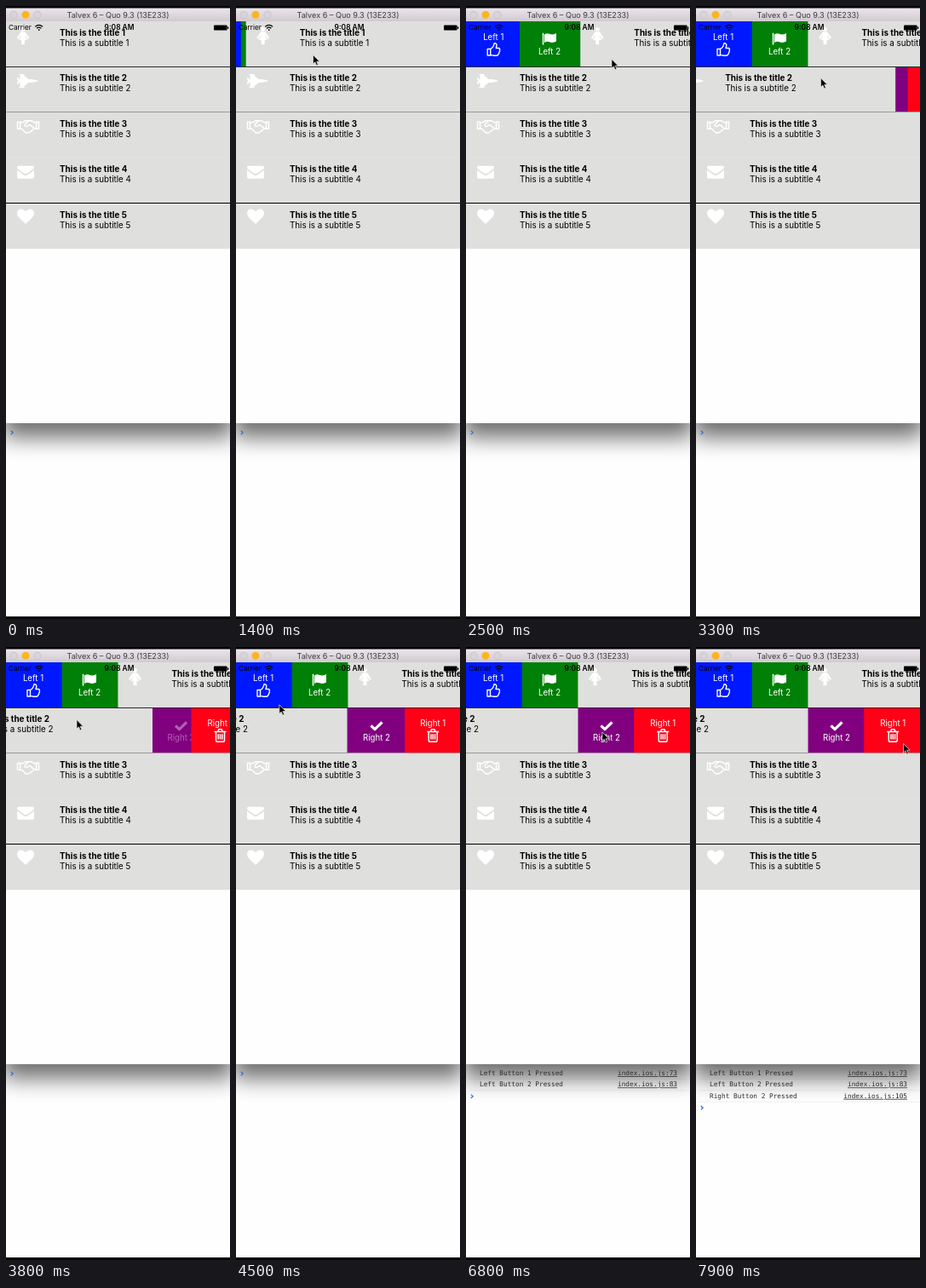
Write an HTML page that moves like this. It is 263 by 720 pixels and loops after 8 s.

```html
<!DOCTYPE html>
<html lang="en">
<head>
<meta charset="utf-8">
<title>Swipeable list</title>
<style>
  html, body { margin: 0; width: 263px; height: 720px; overflow: hidden; background: #fefefe; }
  svg { display: block; font-family: Inter, Roboto, sans-serif; }
  .title { font-size: 9.9px; font-weight: 700; }
  .sub { font-size: 9.8px; }
  .label { font-size: 9.7px; fill: #fff; text-anchor: middle; }
  .log { font: 7.75px "DejaVu Sans Mono", monospace; fill: #2b2b2b; }
  .link { text-anchor: end; text-decoration: underline; }
  .solid { fill: #fff; }
  .outline { fill: none; stroke: #fff; stroke-linejoin: round; }
</style>
</head>
<body>
<svg id="stage" width="263" height="720" viewBox="0 0 263 720">
  <defs>
    <linearGradient id="bar" x2="0" y2="1">
      <stop stop-color="#ece5ec"/><stop offset="1" stop-color="#d0cbd0"/>
    </linearGradient>
    <filter id="soft" x="-30%" y="-30%" width="160%" height="160%"><feGaussianBlur stdDeviation="13"/></filter>
    <clipPath id="below"><rect y="490" width="263" height="227"/></clipPath>
  </defs>
  <rect width="263" height="720" fill="#fefefe"/>
  <g clip-path="url(#below)">
    <rect x="-4" y="300" width="271" height="207" opacity=".56" filter="url(#soft)"/>
  </g>
  <g id="console"></g>
  <path id="prompt" d="M5.8-2.2L8.2 0 5.8 2.2" fill="none" stroke="#2f6fd8" stroke-width="1.2"/>
  <g id="list"></g>
  <g id="lines"></g>
  <g id="status">
    <text x="3" y="28.3" font-size="8.2">Carrier</text>
    <g fill="none" stroke="#000" stroke-width="1.2">
      <path d="M34.3 24.2q4.4-3.6 8.8 0M36 26.2q2.7-2.2 5.4 0"/>
      <path d="M38 28.2h1.4" stroke-width="1.8"/>
    </g>
    <text x="133" y="28.4" font-size="8.4" font-weight="600" text-anchor="middle">9:08 AM</text>
    <rect x="244" y="22.6" width="15.6" height="6" rx="1"/>
    <rect x="260" y="24.4" width="1.3" height="2.4"/>
  </g>
  <rect width="263" height="10" fill="#000"/>
  <rect y="2.5" width="263" height="15.5" fill="url(#bar)"/>
  <g fill="#d9d4d9" stroke="#c6c1c6" stroke-width=".8">
    <circle cx="9" cy="10.3" r="4.1"/><circle cx="37" cy="10.3" r="4.1"/>
  </g>
  <circle cx="23" cy="10.3" r="4.5" fill="#fbb51e"/>
  <text x="131.5" y="13.7" font-size="9.1" fill="#3c3a3c" text-anchor="middle">Talvex 6 – Quo 9.3 (13E233)</text>
  <rect y="717" width="263" height="3"/>
  <path id="cursor" d="M0 0V10.5L2.4 8.3 4 12.2 5.8 11.4 4.2 7.7H7.6z" stroke="#e8e8e8" stroke-width=".7"/>
</svg>
<script>
const W = 263, TOP = 18, ROW_H = 53.4, OPEN = 131.5, HALF = OPEN / 2;
const LOOP = 8000, STEP = 100;
const $ = id => document.getElementById(id);
const clamp = v => Math.max(0, Math.min(1, v));
const moveTo = (node, x, y) => node.setAttribute('transform', `translate(${x} ${y})`);

function add(parent, tag, attrs = {}, text = '') {
  const node = document.createElementNS('http://www.w3.org/2000/svg', tag);
  for (const key in attrs) node.setAttribute(key, attrs[key]);
  node.textContent = text;
  parent.append(node);
  return node;
}

const solid = d => ({ d, class: 'solid' });
const outline = (d, width) => ({ d, class: 'outline', 'stroke-width': width });

const icons = {
  person: solid('M0-9.7a2.5 2.5 0 0 1 0 5 2.5 2.5 0 0 1 0-5zM-2.5-4.2h5L7 2.2q.6 1.4-.6 1.8-1 .2-1.5-.6L2.3-.6V.4L5 5.5H2V10q0 .8-1 .8H-1q-1 0-1-.8V5.5H-5L-2.3.4V-.6L-4.9 3.4q-.6.8-1.5.6-1.2-.4-.6-1.8z'),
  jet: solid('M-9.5-8h6q1 0 0 .8h-1l6 5.2h3.5l6 1.2q1.5.4 1.5.8t-1.5.8L5 2H1.5l-6 5.2h1q1 .8 0 .8h-6q-1 0 0-.8h1V2h-1l-1.5 2h-1V1.5h.8v-3h-.8V-4h1l1.5 2h1V-7.2h-1q-1-.8 0-.8z'),
  shake: outline('M-12.5-5h3v8h-3zM12.5-5h-3v8h3zM-9.5-4.5h3l3-2H0M9.5-4.5h-2L4-6.5H.5l-4 4q-1 2 .5 2.6 2 .6 3.5-1.6h2L8 3h2M-9.5 3h2l4 4q2 1.5 3 .3 2 .6 2.6-.9 2 0 2-1.7 2 0 1.8-1.8', 1.5),
  mail: solid('M-10-2.5l8 5.7q2 1.2 4 0l8-5.7V5.7q0 1.8-1.8 1.8H-8.2Q-10 7.5-10 5.7zM-8.2-7.5H8.2Q10-7.5 10-5.8 10-4.4 8-3L2 1.4q-2 1.2-4 0L-8-3Q-10-4.4-10-5.8-10-7.5-8.2-7.5z'),
  heart: solid('M0 8.8L-7.8 1.2Q-10-1-10-4-10-8.8-5-8.8-2.4-8.8 0-5.9 2.4-8.8 5-8.8 10-8.8 10-4 10-1 7.8 1.2z'),
  thumb: outline('M-7-.5h3.5V7H-7zM-3.5-.5C-1.5-1.5.5-4 .8-7 2.5-7.6 4-6.5 3.8-4.5L3-1.5H6.2Q8-1 7.2.8 8 2.5 6.6 3.4 7 5 5.6 5.6 5.6 7.3 3.5 7.3H.5Q-1.5 7-3.5 6.3', 1.4),
  flag: solid('M-8.2-6.8h1.5V7h-1.5zM-6-5q3-2 6-.8 4 1.8 8-.6V3q-4 2.4-8 .8-3-1.2-6 .8z'),
  check: outline('M-6.5 0L-2 4.3 6.5-4', 3.2),
  trash: outline('M-5-4.5V5.5q0 1.8 1.8 1.8h6.4Q5 7.3 5 5.5V-4.5M-7-4.5H7M-2.8-4.5l1-2.7h3.6l1 2.7M-2.3-1.8V4.5M0-1.8V4.5M2.3-1.8V4.5', 1.5)
};

function addIcon(parent, name, x, y) {
  moveTo(add(parent, 'path', icons[name]), x, y);
}

// Each row: icon name, icon centre x and y.
const rows = [['person', 20, 16.5], ['jet', 25, 16.5], ['shake', 26, 16.5], ['mail', 23, 17], ['heart', 23, 15.6]]
  .map(([icon, x, y], i) => {
    const group = add($('list'), 'g', { transform: `translate(0 ${TOP + i * ROW_H})` });
    const face = add(group, 'g');
    add(face, 'rect', { width: W, height: ROW_H + .2, fill: '#dfdfde' });
    addIcon(face, icon, x, y);
    add(face, 'text', { x: 63, y: 17, class: 'title' }, `This is the title ${i + 1}`);
    add(face, 'text', { x: 63, y: 29, class: 'sub' }, `This is a subtitle ${i + 1}`);
    return { group, face };
  });

[[71, '#2c2c2c'], [124, '#989898'], [231, '#000']].forEach(([y, fill]) =>
  add($('lines'), 'rect', { y, width: W, height: 1, fill }));

function addButton(row, fill, label, labelY, icon, iconY) {
  const group = add(row.group, 'g');
  const back = add(group, 'rect', { height: ROW_H, fill });
  const content = add(group, 'g');
  add(content, 'text', { y: labelY, class: 'label' }, label);
  addIcon(content, icon, 0, iconY);
  const shade = add(group, 'rect', { height: ROW_H, opacity: .2 });
  return { back, content, shade };
}

const left2 = addButton(rows[0], '#008007', 'Left 2', 38.6, 'flag', 20.5);
const left1 = addButton(rows[0], '#0018ff', 'Left 1', 21.8, 'thumb', 33);
const right2 = addButton(rows[1], '#800080', 'Right 2', 38.8, 'check', 21);
const right1 = addButton(rows[1], '#ff0016', 'Right 1', 21.8, 'trash', 32.6);

function placeButton({ back, content, shade }, x, width, centre, opacity, pressed) {
  for (const rect of [back, shade]) {
    rect.setAttribute('x', x);
    rect.setAttribute('width', Math.max(0, width));
  }
  shade.setAttribute('visibility', pressed ? 'visible' : 'hidden');
  moveTo(content, centre, 0);
  content.setAttribute('opacity', clamp(opacity));
}

const LOG_H = 13.4;
const logs = [
  [5200, 'Left Button 1 Pressed', 73],
  [6100, 'Left Button 2 Pressed', 83],
  [7100, 'Right Button 2 Pressed', 105]
].map(([time, message, line], i) => {
  const y = 503 + i * LOG_H;
  const group = add($('console'), 'g');
  add(group, 'text', { x: 16, y, class: 'log' }, message);
  add(group, 'text', { x: 248, y, class: 'log link' }, `index.ios.js:${line}`);
  add(group, 'rect', { x: 3, y: y + 4, width: 260, height: .7, fill: '#8a97b0', opacity: .2 });
  return { time, group };
});

// Keys are [time, value, ...]; values run straight between them.
function track(keys, t) {
  const next = keys.findIndex(key => key[0] > t);
  if (next === 0) return keys[0].slice(1);
  if (next < 0) return keys[keys.length - 1].slice(1);
  const a = keys[next - 1], b = keys[next];
  const p = (t - a[0]) / (b[0] - a[0]);
  return a.slice(1).map((v, i) => v + (b[i + 1] - v) * p);
}

const cursorKeys = [
  [300, 40.5, 178], [400, 45.5, 159.5], [500, 45.5, 159.5], [800, 62, 100], [1100, 76.5, 57.5],
  [1200, 76.5, 57.5], [1400, 90.5, 57.5], [2100, 190, 60.5], [2200, 203, 61], [2300, 196, 61],
  [2500, 171, 62.5], [3000, 175, 84], [3100, 172, 84.5], [3800, 83, 85.5], [3900, 70, 86],
  [4100, 64, 85], [4800, 41, 55], [5300, 41, 55], [5500, 86.5, 54.5], [5700, 92, 54.5],
  [6000, 92, 54.5], [6800, 160, 100], [7000, 160, 100], [7800, 242.5, 113.5], [7900, 243.5, 113.5]
];
const leftKeys = [
  [1200, 0], [1400, 11.7], [2100, 112], [2200, 126], [2300, 138], [2400, 138.5],
  [2500, 134.3], [2600, 132.4], [2800, OPEN]
];
const rightKeys = [
  [3000, 0], [3100, 4], [3800, 91], [3900, 105], [4000, 120], [4100, 134], [4200, 136],
  [4400, 133], [4700, OPEN]
];

function render(t) {
  const pressed = start => t >= start && t < start + STEP;
  const outerWidth = x => x > OPEN ? HALF - (x - OPEN) : x / 2;

  const [l] = track(leftKeys, t), lOuter = outerWidth(l);
  moveTo(rows[0].face, l, 0);
  placeButton(left2, 0, l, Math.min(l, OPEN) - 33.5, (l - HALF) / HALF, pressed(6000));
  placeButton(left1, 0, lOuter, Math.min(lOuter - 33.5, 32) + (l > OPEN ? l - OPEN : 0), l / HALF, pressed(5100));

  const [r] = track(rightKeys, t), rOuter = outerWidth(r);
  moveTo(rows[1].face, -r, 0);
  placeButton(right2, W - r, r, W - Math.min(r, OPEN) + 33.5, (r - HALF) / HALF, pressed(7000));
  placeButton(right1, W - rOuter, rOuter, W - Math.min(r, OPEN) / 2 + 34, r / HALF, false);

  let shown = 0;
  for (const { time, group } of logs) {
    const visible = t >= time;
    group.setAttribute('visibility', visible ? 'visible' : 'hidden');
    if (visible) shown++;
  }
  moveTo($('prompt'), 0, 501 + shown * LOG_H);

  $('cursor').setAttribute('visibility', t < 300 ? 'hidden' : 'visible');
  moveTo($('cursor'), ...track(cursorKeys, t));
}

function frame(now) {
  render(Math.floor((now % LOOP) / STEP) * STEP);
  requestAnimationFrame(frame);
}
render(0);
requestAnimationFrame(frame);
</script>
</body>
</html>
```
